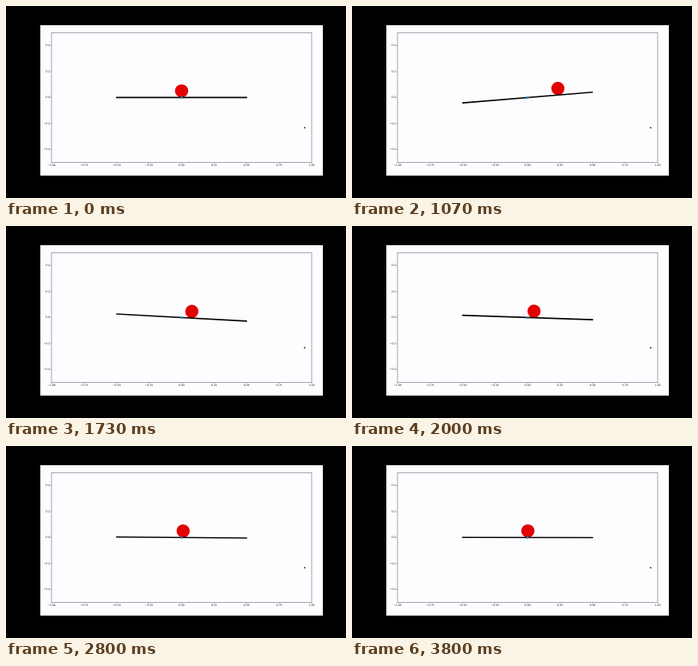
Write an HTML page with a canvas that moves like this. It is 426 px wide and 240 px high and loops after 3.87 s.

```html
<!DOCTYPE html>
<html lang="en">
<head>
<meta charset="utf-8">
<title>Ball on beam</title>
<style>
html, body { margin: 0; width: 100%; height: 100%; overflow: hidden; background: #000; }
canvas { display: block; width: 426px; height: 240px; }
</style>
</head>
<body>
<canvas width="426" height="240"></canvas>
<script>
const ctx = document.querySelector('canvas').getContext('2d');
const LOOP = 3870, STEP = 200 / 3;
const SCALE = 163, CX = 220, CY = 114.4;
const BOX = { left: 57, right: 383, top: 33.5, bottom: 195.5 };
const SETTLE = 1.4;

// Knots: time (s), value, slope.
const POSITION = [[0, 0, .74], [.6, .298, .12], [1.07, .237, -.3], [SETTLE, .1366, -.239]];
const ANGLE = [[0, 0, .5], [.6, .397, -.3], [1.07, .08, -.65], [SETTLE, -.0996, .18]];

function hermite(knots, t) {
  const i = knots.findIndex(k => t < k[0]);
  const [t0, a, va] = knots[i - 1], [t1, b, vb] = knots[i];
  const h = t1 - t0, u = (t - t0) / h, w = 1 - u;
  return w * w * ((1 + 2 * u) * a + u * h * va) + u * u * ((1 + 2 * w) * b - w * h * vb);
}

// The controlled beam overshoots, then both values decay exponentially.
function pose(t) {
  if (t < SETTLE) return [hermite(POSITION, t), hermite(ANGLE, t)];
  return [.1366 * Math.exp(-1.75 * (t - SETTLE)), -.0996 * Math.exp(-1.8 * (t - SETTLE))];
}

function line(x1, y1, x2, y2) {
  ctx.beginPath();
  ctx.moveTo(x1, y1);
  ctx.lineTo(x2, y2);
  ctx.stroke();
}

function disc(x, y, r, color) {
  ctx.fillStyle = color;
  ctx.beginPath();
  ctx.arc(x, y, r, 0, 2 * Math.PI);
  ctx.fill();
}

const label = (v, digits) => v.toFixed(digits).replace('-', '\u2212');

function drawAxes() {
  ctx.fillStyle = '#000';
  ctx.fillRect(0, 0, 426, 240);
  ctx.fillStyle = '#fdfdff';
  ctx.fillRect(43, 24, 354, 188);

  ctx.strokeStyle = '#66667a';
  ctx.lineWidth = .6;
  ctx.strokeRect(BOX.left, BOX.top, BOX.right - BOX.left, BOX.bottom - BOX.top);

  ctx.fillStyle = '#222';
  ctx.font = '3.4px "DejaVu Sans", sans-serif';
  ctx.textBaseline = 'middle';
  ctx.textAlign = 'center';
  for (let i = -4; i <= 4; i++) {
    const x = CX + i * SCALE / 4;
    line(x, BOX.bottom, x, BOX.bottom + 1.2);
    ctx.fillText(label(i / 4, 2), x, 199.2);
  }
  ctx.textAlign = 'right';
  for (let i = -2; i <= 2; i++) {
    const y = CY - i * 32.4;
    line(BOX.left - 1.2, y, BOX.left, y);
    ctx.fillText(label(i / 5, 1), 55, y);
  }
  disc(374.2, 152.2, .9, '#111');
}

function drawBeam(t) {
  const [s, angle] = pose(t);
  ctx.save();
  ctx.translate(CX, CY);
  ctx.rotate(-angle);
  disc(s * SCALE, -8.2, 8.3, '#e30000');
  ctx.strokeStyle = '#000';
  ctx.lineWidth = 1.6;
  ctx.lineCap = 'round';
  line(-SCALE / 2, 0, SCALE / 2, 0);
  ctx.restore();
  disc(CX, CY, 1.5, '#2c7fc0');
}

// Steps of 1/15 s, with each start rounded to 10 ms.
function stepIndex(ms) {
  const i = Math.floor((ms + 4) / STEP);
  return Math.round(i * STEP / 10) * 10 > ms ? i - 1 : i;
}

const start = performance.now();
function frame() {
  const ms = Math.max(0, performance.now() - start) % LOOP;
  drawAxes();
  drawBeam(Math.min(57, stepIndex(ms)) * STEP / 1000);
  requestAnimationFrame(frame);
}
frame();
</script>
</body>
</html>
```
